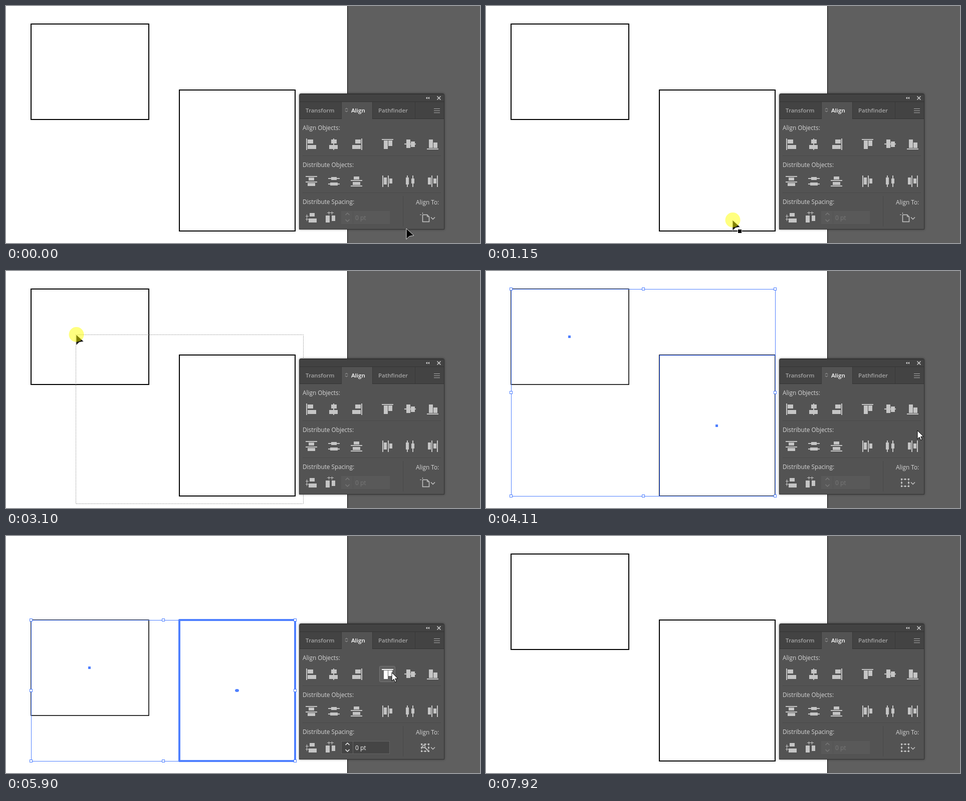
Animation of 946x474 px, one loop 8 s. Source, as an HTML page with a canvas:

```html
<!DOCTYPE html>
<html lang="en">
<head>
<meta charset="utf-8">
<title>Align panel</title>
<style>
html, body { margin: 0; width: 100%; height: 100%; overflow: hidden; background: #fff; }
canvas { display: block; }
</style>
</head>
<body>
<canvas id="stage" width="946" height="474"></canvas>
<script>
const g = document.getElementById('stage').getContext('2d');
const LOOP = 8000, STEP = 77.67;
const BLUE = '#4f80ff', ICON = '#c5c5c5';

// Pointer path: step, x, y
const path = [
  [0, 799, 445], [5, 160, 90], [7, 22, 15], [9, 78, 62], [11, 248, 210],
  [13, 412, 377], [15, 492, 428], [19, 582, 467], [20, 582, 467], [27, 592, 463],
  [29, 595, 465], [32, 595, 465], [35, 480, 378], [38, 292, 255], [40, 140, 127],
  [42, 55, 45], [43, 55, 45], [44, 43, 22], [50, 620, 230], [53, 861, 319],
  [54, 830, 328], [59, 577, 330], [61, 577, 330], [65, 815, 283], [67, 840, 285],
  [68, 840, 285], [71, 770, 276], [73, 770, 273], [90, 770, 273], [94, 595, 121],
  [95, 595, 121], [99, 188, 75], [100, 50, 24], [102, -40, 10]
];

function pointer(k) {
  const i = path.findIndex(p => p[0] > k);
  if (i < 0) return path[path.length - 1].slice(1);
  const a = path[i - 1], b = path[i], f = (k - a[0]) / (b[0] - a[0]);
  return [1, 2].map(n => Math.round(a[n] + (b[n] - a[n]) * f));
}

const within = (k, a, b) => k >= a && k < b;

function box(x, y, w, h, color) {
  g.fillStyle = color;
  g.fillRect(x, y, w, h);
}
function frame(x, y, w, h, color, width = 1) {
  g.strokeStyle = color;
  g.lineWidth = width;
  g.strokeRect(x, y, w, h);
}
function line(points, color, width = 1) {
  g.beginPath();
  points.forEach(p => g.lineTo(...p));
  g.strokeStyle = color;
  g.lineWidth = width;
  g.stroke();
}
function text(s, x, y, size, color, weight = 400) {
  g.font = `${weight} ${size}px "Open Sans", "Noto Sans", sans-serif`;
  g.fillStyle = color;
  g.fillText(s, x, y);
}
function chevron(x, y, r, dir, color, width = 1.3) {
  line([[x - r, y - dir * r / 2], [x, y + dir * r / 2], [x + r, y - dir * r / 2]], color, width);
}

// Icon bar: u runs along the bar, v across it
function bar(cx, cy, upright, u, v, length, depth, color = ICON) {
  if (upright) box(cx + v, cy + u, depth, length, color);
  else box(cx + u, cy + v, length, depth, color);
}

// side: -1 start, 0 centre, 1 end
function alignIcon(cx, cy, upright, side, color) {
  bar(cx, cy, !upright, -11, side < 0 ? -10 : side ? 9 : -1, 23, 2, color);
  const lengths = upright ? [17, 11] : [11, 17];
  lengths.forEach((n, i) => {
    const u = side < 0 ? -7 : side ? 8 - n : -Math.floor(n / 2) - (n > 11 ? 1 : 0);
    bar(cx, cy, upright, u, i ? 2 : upright ? -7 : -9, n, 8, color);
  });
}

function distributeIcon(cx, cy, upright, side) {
  const first = -6 + side * 4, lengths = upright ? [14, 10] : [11, 15];
  lengths.forEach((n, i) => {
    const v = first + i * 11;
    bar(cx, cy, upright, -11, v, 23, 2);
    bar(cx, cy, upright, -Math.floor(n / 2), side < 0 ? v + 3 : side ? v - 7 : v - 2, n, 6);
  });
}

function spacingIcon(cx, cy, upright) {
  const v = upright ? -10 : -9;
  bar(cx, cy, !upright, -6, v, 13, 1);
  for (const u of [-3, 3]) bar(cx, cy, upright, v - 2, u, 6, 1);
  if (upright) {
    bar(cx, cy, true, -4, -9, 14, 8);
    bar(cx, cy, true, -4, 3, 11, 7);
  } else {
    bar(cx, cy, false, -3, -9, 10, 7);
    bar(cx, cy, false, -5, 2, 16, 8);
  }
}

function hotButton(x, y) {
  g.beginPath();
  g.roundRect(x - 15.5, y - 15.5, 31, 31, 2);
  g.fillStyle = '#5f5f5f';
  g.fill();
  g.strokeStyle = '#777';
  g.lineWidth = 1;
  g.stroke();
}

function icons(hover) {
  for (const upright of [false, true])
    for (const side of [-1, 0, 1]) {
      const x = (upright ? 806 : 654) + side * 45;
      const hot = hover && Math.abs(hover[0] - x) < 16 && Math.abs(hover[1] - 276) < 16;
      if (hot) hotButton(x, 276);
      alignIcon(!upright && side > 0 ? x + 1 : x, 276, upright, side, hot ? '#fff' : ICON);
      distributeIcon(x, 350, upright, side);
    }
  spacingIcon(609, 423, false);
  spacingIcon(647, 423, true);
}

function alignTo(mode) {
  if (mode === 'page') {
    g.save();
    g.translate(831.5, 417.5);
    line([[0, 0], [9, 0], [13, 4], [13, 14], [0, 14], [0, 0]], ICON, 1.5);
    line([[9, 0], [9, 4], [13, 4]], ICON);
    g.restore();
    box(826, 417, 3, 1, ICON);
    box(831, 413, 1, 3, ICON);
  } else {
    g.setLineDash([1, 1]);
    frame(829.5, 416.5, 14, 14, ICON);
    g.setLineDash([]);
    for (const x of [828, 835, 842])
      for (const y of [415, 422, 429])
        if (x !== 835 || y !== 422) box(x, y, 3, 3, ICON);
    if (mode === 'key') {
      g.beginPath();
      g.arc(834, 421, 2.5, 0, 7);
      g.strokeStyle = ICON;
      g.lineWidth = 1.5;
      g.stroke();
      line([[836, 423], [842, 429]], ICON, 2);
    }
  }
  chevron(852, 424.5, 4, 1, ICON, 1.5);
}

function panel(mode, pos) {
  g.save();
  g.shadowColor = 'rgba(0,0,0,.45)';
  g.shadowBlur = 4;
  g.beginPath();
  g.roundRect(585, 175, 290, 272, [4, 4, 0, 0]);
  g.fillStyle = '#343434';
  g.fill();
  g.restore();
  box(586, 177, 288, 14, '#424242');
  box(586, 192, 288, 33, '#434343');
  box(586, 226, 288, 220, '#535353');
  box(670, 192, 61, 34, '#535353');
  for (const x of [669, 731, 816]) box(x, 192, 1, 33, '#393939');

  for (const x of [838, 842]) {
    g.beginPath();
    g.moveTo(x, 184);
    g.lineTo(x + 3, 181.5);
    g.lineTo(x + 3, 186.5);
    g.fillStyle = '#d0d0d0';
    g.fill();
  }
  for (const d of [-3.5, 3.5]) line([[864 - d, 180.5], [864 + d, 187.5]], '#d0d0d0', 1.5);
  for (const y of [205, 209, 213]) box(854, y, 12, 1, '#aaa');

  text('Transform', 598, 213, 11.5, '#a6a6a6', 600);
  text('Align', 689, 213, 11.5, '#fff', 600);
  text('Pathfinder', 743, 213, 11.5, '#a6a6a6', 600);
  chevron(679.5, 205.5, 2.5, -1, '#bbb', 1);
  chevron(679.5, 210.5, 2.5, 1, '#bbb', 1);

  ['Align Objects:', 'Distribute Objects:', 'Distribute Spacing:'].forEach((s, i) =>
    text(s, 592, 248 + i * 74, 11.8, '#d6d6d6'));
  text('Align To:', 818, 397, 11.8, '#d6d6d6');
  for (const y of [299, 373]) box(592, y, 276, 1, '#494949');
  box(792, 380, 1, 61, '#494949');
  icons(pos);

  const on = mode === 'key';
  box(669, 410, 97, 26, on ? '#454545' : '#595959');
  if (on) frame(669.5, 410.5, 96, 25, '#626262');
  box(692, 411, 1, 24, on ? '#626262' : '#535353');
  const ink = on ? '#f2f2f2' : '#777';
  chevron(681.5, 416, 4, -1, ink, 1.5);
  chevron(681.5, 429, 4, 1, ink, 1.5);
  text('0 pt', 697, 428, 12, ink);
  alignTo(mode);
}

function shapes(top, selected, key) {
  const rects = [[50, top, 235, 191], [346, 168, 231, 282]];
  rects.forEach(([x, y, w, h], i) => {
    if (key && i === 1) {
      g.lineJoin = 'round';
      frame(x, y, w, h, BLUE, 4);
      g.lineJoin = 'miter';
      g.beginPath();
      g.ellipse(461, 309, 4, 3, 0, 0, 7);
      g.fillStyle = BLUE;
      g.fill();
      return;
    }
    frame(x, y, w, h, '#000', selected ? 1.6 : 2);
    if (!selected) return;
    line([[x + .5, y + h], [x + .5, y + .5], [x + w, y + .5]], '#1c50ee');
    box(Math.floor(x + w / 2) - 3, Math.floor(y + h / 2) - 2, 5, 5, BLUE);
  });
  if (!selected) return;
  const y0 = Math.min(top, 168), mid = Math.round((y0 + 450) / 2);
  frame(50.5, y0 + .5, 527, 450 - y0, BLUE);
  for (const x of [50, 314, 577])
    for (const y of [y0, mid, 450]) {
      if (x === 314 && y === mid) continue;
      box(x - 3, y - 3, 6, 6, '#fff');
      frame(x - 2.5, y - 2.5, 5, 5, BLUE);
    }
}

function cursor(x, y, overPanel) {
  const outline = overPanel
    ? [[0, 0], [0, 17], [4, 13.3], [6.7, 19.3], [9.3, 18.2], [6.7, 12.3], [12, 12]]
    : [[0, 0], [0, 21.5], [6, 15.5], [15, 14]];
  g.beginPath();
  outline.forEach(([dx, dy]) => g.lineTo(x + dx, y + dy));
  g.closePath();
  g.fillStyle = overPanel ? '#fff' : '#000';
  g.fill();
  g.strokeStyle = overPanel ? '#000' : '#e4e4e4';
  g.lineWidth = 1;
  g.stroke();
}

function tooltip() {
  box(773, 301, 129, 24, 'rgba(0,0,0,.35)');
  box(770, 298, 130, 25, '#fff');
  frame(770.5, 298.5, 129, 24, '#767676');
  text('Vertical Align Top', 776, 316, 14.5, '#575757');
}

function marquee(x, y) {
  g.setLineDash([1, 2]);
  line([[x, y + .5], [593.5, y + .5], [593.5, 465.5]], '#555');
  line([[x - .5, y], [x - .5, 465.5], [593.5, 465.5]], '#555');
  g.setLineDash([]);
}

// Steps during which the pointer is highlighted
const glow = [[7, 21], [29, 45], [59, 61], [73, 76], [94, 96]];

function draw(t) {
  const k = Math.floor((t + 26) / STEP);
  const [x, y] = pointer(k);
  const key = within(k, 60, 92);
  const mode = k < 43 ? 'page' : key ? 'key' : 'bounds';
  const overPanel = x >= 585 && x < 875 && y > 175 && y < 440;

  box(0, 0, 946, 474, '#fff');
  box(681, 0, 1, 474, '#000');
  box(682, 0, 264, 474, '#5f5f5f');
  shapes(within(k, 74, 92) ? 168 : 36, within(k, 43, 94), key);
  if (within(k, 33, 43)) marquee(x, y);
  panel(mode, overPanel && [x, y]);
  if (within(k, 81, 91)) tooltip();

  cursor(x, y, overPanel);
  if (k === 15) {
    box(x + 10, y + 18, 9, 9, '#fff');
    box(x + 11, y + 19, 7, 7, '#000');
  }
  if (glow.some(([a, b]) => within(k, a, b))) {
    g.beginPath();
    g.arc(x + .5, y, 15, 0, 7);
    g.fillStyle = 'rgba(255,255,0,.5)';
    g.fill();
  }
}

function tick() {
  draw(performance.now() % LOOP);
  requestAnimationFrame(tick);
}
tick();
</script>
</body>
</html>
```
